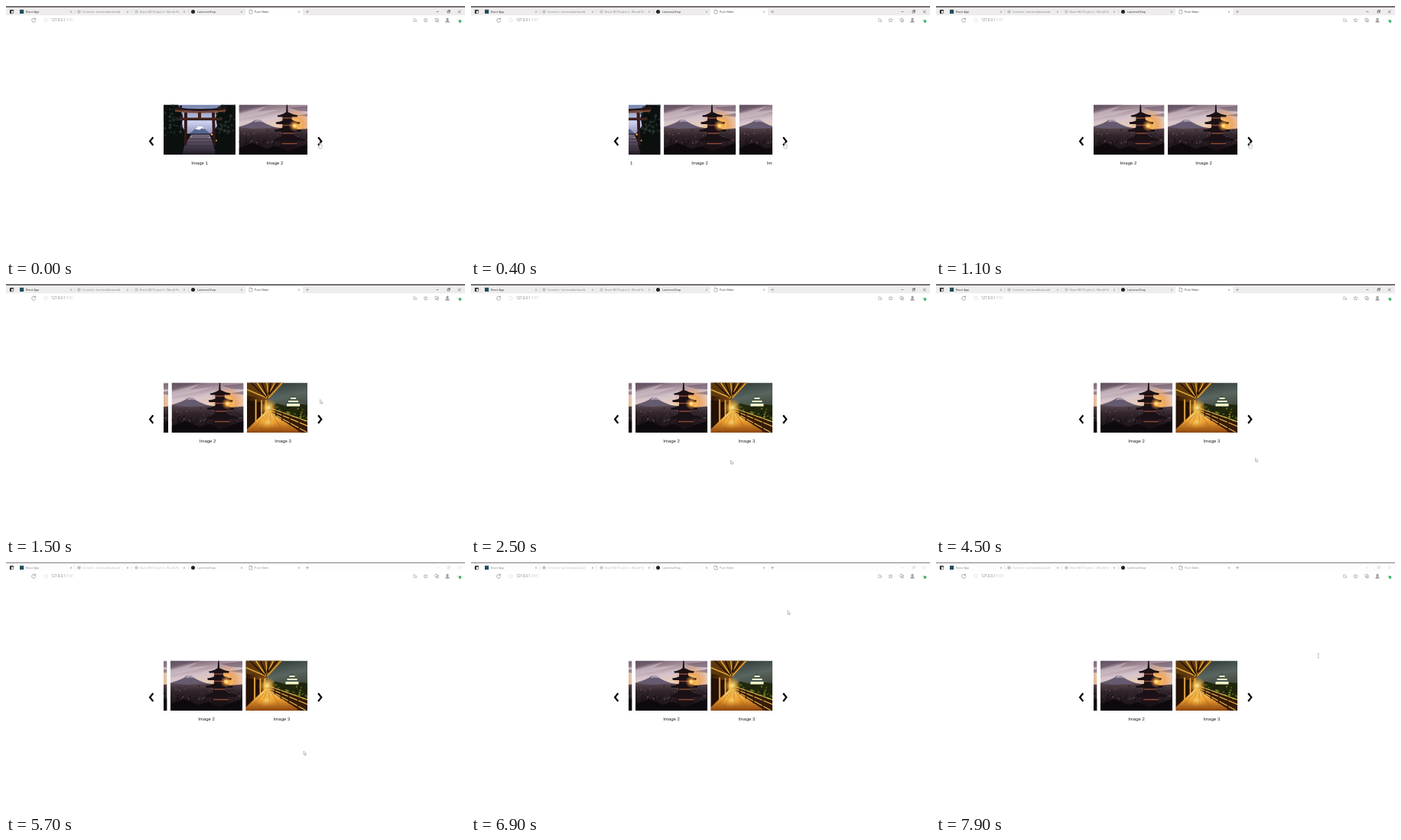
Animation of 600x328 px, one loop 8 s. Source, as an HTML page:

```html
<!DOCTYPE html>
<html lang="en">
<head>
<meta charset="utf-8">
<title>Pure Slider</title>
<style>
  html, body { margin: 0; width: 100%; height: 100%; overflow: hidden; background: #fff; }
  svg { display: block; width: 600px; height: 328px; }
  text { font-family: "Liberation Sans", Arial, sans-serif; }
  .tab, .url { font-family: "Open Sans", sans-serif; font-size: 3.7px; }
  .url { font-size: 4.4px; }
  .label { font-size: 6px; text-anchor: middle; fill: #222; }
  .line { fill: none; stroke: #777; stroke-width: .5; }
</style>
</head>
<body>
<svg viewBox="0 0 600 328" xmlns="http://www.w3.org/2000/svg">
  <defs>
    <clipPath id="view"><rect x="206" y="120" width="188" height="100"/></clipPath>
    <clipPath id="frame"><rect width="94" height="65.5"/></clipPath>
    <filter id="soft" x="0" y="0" width="1" height="1"><feGaussianBlur stdDeviation=".45"/></filter>
    <linearGradient id="dusk" x2="0" y2="1">
      <stop offset="0" stop-color="#7583b0"/><stop offset=".35" stop-color="#ccd0ee"/><stop offset=".6" stop-color="#8e8bb0"/>
    </linearGradient>
    <linearGradient id="path" x2="0" y2="1">
      <stop offset="0" stop-color="#776a80"/><stop offset="1" stop-color="#1f1922"/>
    </linearGradient>
    <linearGradient id="sunset" x2=".2" y2="1">
      <stop offset="0" stop-color="#665664"/><stop offset=".17" stop-color="#9f8894"/>
      <stop offset=".34" stop-color="#d5c3cb"/><stop offset=".5" stop-color="#e8cdb9"/>
    </linearGradient>
    <radialGradient id="sun">
      <stop offset="0" stop-color="#fffbe0"/><stop offset=".18" stop-color="#ffd566"/>
      <stop offset=".45" stop-color="#f2983c" stop-opacity=".7"/><stop offset="1" stop-color="#d98a50" stop-opacity="0"/>
    </radialGradient>
    <linearGradient id="town" x2="0" y2="1">
      <stop offset="0" stop-color="#5a4850"/><stop offset=".3" stop-color="#30242a"/><stop offset="1" stop-color="#140e13"/>
    </linearGradient>
    <linearGradient id="night" x2=".3" y2="1">
      <stop offset="0" stop-color="#202a29"/><stop offset=".4" stop-color="#59655f"/><stop offset="1" stop-color="#1c200c"/>
    </linearGradient>
    <linearGradient id="wall">
      <stop offset="0" stop-color="#2f1706"/><stop offset=".45" stop-color="#754211"/><stop offset="1" stop-color="#d09130"/>
    </linearGradient>
    <linearGradient id="deck" x2="0" y2="1">
      <stop offset="0" stop-color="#ffe584"/><stop offset=".45" stop-color="#eda032"/><stop offset="1" stop-color="#8a430d"/>
    </linearGradient>
    <radialGradient id="lamp">
      <stop offset="0" stop-color="#fff0a0"/><stop offset=".4" stop-color="#f9bd45" stop-opacity=".75"/><stop offset="1" stop-color="#e49527" stop-opacity="0"/>
    </radialGradient>

    <g id="gate" clip-path="url(#frame)">
      <rect width="94" height="66" fill="url(#dusk)"/>
      <g filter="url(#soft)">
        <path d="M32 40 45 28 50 28 63 40Z" fill="#566790"/>
        <path d="M41 32 45 28 50 28 54 32 50 31 47 33Z" fill="#f0f3fc"/>
        <path d="M0 38H94V66H0Z" fill="#110f15"/>
        <path d="M36 39H60L72 66H20Z" fill="url(#path)"/>
        <path d="M0 0H19L25 14 24 28 31 40 24 66H0Z" fill="#0b100f"/>
        <path d="M94 0H75L68 17 70 28 62 38 68 66H94Z" fill="#0b100f"/>
        <g id="leaves"></g>
        <path d="M27 10H31L30.500 53H27ZM63 10H67L68 53H64.500Z" fill="#30181a"/>
        <path d="M14 3Q47 8 82 3L83 6Q47 11 13 6Z" fill="#26161a"/>
        <path d="M15 6.500Q47 11 81 6.500V9Q47 13 15 9Z" fill="#7c4632"/>
        <path d="M20 17H76V20.500H20ZM45 10H49V18H45Z" fill="#40221e"/>
        <g fill="#ffb45a"><circle cx="63" cy="39" r="1.300"/><circle cx="36" cy="42" r=".8"/><circle cx="69" cy="47" r="1"/><circle cx="60" cy="43" r=".8"/></g>
        <path d="M33 45H62M31 49H64M29 54H66M26 60H69" stroke="#383040" stroke-width=".8"/>
      </g>
    </g>

    <g id="pagoda" clip-path="url(#frame)">
      <rect width="94" height="66" fill="url(#sunset)"/>
      <g filter="url(#soft)">
        <path d="M0 12 36 2 24 9 54 6 30 13 0 19ZM36 16 58 10 50 16Z" fill="#d6c5ce" opacity=".55"/>
        <path d="M0 0H40L16 5 0 10ZM66 4 94 1V9L78 8ZM76 14 94 11V16Z" fill="#57465a" opacity=".5"/>
        <path d="M0 29Q15 25 22 19.500L27 19.500Q34 26 52 31V36H0Z" fill="#655a70"/>
        <path d="M22 19.500 27 19.500 31 23 26 22 20 23Z" fill="#a79bae"/>
        <circle cx="73" cy="27" r="23" fill="url(#sun)"/>
        <path d="M0 29.500 20 31.500 50 30 70 33 94 31V66H0Z" fill="url(#town)"/>
        <g id="roofs"></g>
        <g fill="#1a1116">
          <path d="M62.200 0H63.500L64.200 11H61.500ZM57 14H69V23H57ZM57 24H70V34H57ZM56 35H72V47H56ZM54 48H76V66H54Z"/>
          <path d="M50 14Q57 13 61 10H65Q70 13 77 14L76 16H51ZM48 23Q56 22 59 19.500H69Q73 22 80 23L79 25.500H49ZM46 33Q55 32 58 29H70Q74 32 82 33L81 35.500H47ZM46 45Q54 43 57 40H72Q77 43 87 45L86 48H47Z"/>
        </g>
        <path d="M57 17.500H69M57 27H70M57 37.500H72M56 51H76" stroke="#8a4935" stroke-width="1.500"/>
        <circle cx="73" cy="27.500" r="8" fill="url(#sun)"/>
        <path d="M0 57 18 50 36 58 50 54 63 61 94 50V66H0Z" fill="#0e090d"/>
        <path d="M4 66 10 44M10 52 17 43M30 66 25 46M27 55 35 45M42 66 46 47" stroke="#0e090d" stroke-width=".8"/>
      </g>
    </g>

    <g id="castle" clip-path="url(#frame)">
      <rect width="94" height="66" fill="url(#night)"/>
      <g filter="url(#soft)">
        <path d="M27 35 38 27 53 31 68 28 94 31V66H27Z" fill="#20270d"/>
        <g id="bushes"></g>
        <path d="M49 28 52 25H67L70 28ZM52 24 54 21H66L68 24ZM55 20 60 16 65 20Z" fill="#465a50"/>
        <path d="M52 27.500H69V31H52ZM54 23.500H67V25.500H54ZM57 19.500H64V21.500H57Z" fill="#f4f3ca"/>
        <path d="M0 0H48L27 22V43L0 66Z" fill="url(#wall)"/>
        <path d="M0 0H48L27 21 0 17Z" fill="#5d390d"/>
        <path d="M13 0 26 19M26 0 28 16M36 0 28 17M46 0 28 20M0 9 26 20" stroke="#dfa237" stroke-width="1.600"/>
        <path d="M5 0 25 19M19 0 26 17M31 0 28 15M41 0 28 16" stroke="#251204" stroke-width="1.700"/>
        <path d="M0 23 10 24V55L0 61ZM13 25 18 25V47L13 51ZM20 25H23V42L20 45Z" fill="#251105"/>
        <path d="M11.500 22V56M19 23V47M25 23V43" stroke="#edb34c" stroke-width="1.600"/>
        <path d="M25 37H33L80 66H0V61Z" fill="url(#deck)"/>
        <path d="M29 38 15 66M30 38 32 66M31 38 49 66M27 39 3 66" stroke="#a55b18" stroke-width=".6"/>
        <path d="M32 35 94 58V66H72L32 40Z" fill="#351b08"/>
        <path d="M32 34 94 56M32 37 94 63M32 39.500 78 65" stroke="#f0bc57" stroke-width="1.200"/>
        <path d="M38 36V44M46 39V50M56 43V56M68 47V65M82 53V66" stroke="#3d1d07" stroke-width="1.500"/>
        <circle cx="28" cy="33" r="12" fill="url(#lamp)"/>
        <ellipse cx="27" cy="52" rx="15" ry="9" fill="url(#lamp)" opacity=".6"/>
      </g>
    </g>
  </defs>

  <rect width="600" height="328" fill="#fff"/>
  <rect id="strip" y="1" width="600" height="11.200"/>
  <rect id="edge" width="600" height="2"/>
  <rect x="313" y="3" width="75" height="10" rx="1" fill="#fff"/>
  <g id="tabs"></g>
  <g>
    <rect x="5.300" y="5.300" width="4.400" height="4.400" rx=".8" fill="none" stroke="#333" stroke-width=".6"/>
    <path d="M5 5H10V6.500H7V10H5Z" fill="#333"/>
    <rect x="18" y="4.800" width="5.200" height="5.200" fill="#214e5d"/>
    <circle cx="95.500" cy="7.500" r="2.300" fill="#c4c4c4"/>
    <circle cx="170.500" cy="7.500" r="2.300" fill="#ccc"/>
    <circle cx="244.500" cy="7.500" r="2.500" fill="#222"/>
    <path class="line" d="M318 5H320.500L322 6.500V10H318ZM320.500 5V6.500H322"/>
  </g>
  <path id="buttons" d="M562.500 7.500H565.500M577 6.500H579.500V9H577ZM578 6.500V5.500H580.500V8H579.500M591 5.800 594.500 9.300M594.500 5.800 591 9.300" fill="none" stroke-width=".5"/>

  <g class="line">
    <path d="M38.200 17.200A2.500 2.500 0 1 0 38.700 19M38.600 15.500V17.400H36.700" stroke="#555"/>
    <circle cx="52" cy="18.700" r="2.300" stroke="#ccc"/>
    <path d="M532.500 16.800H535V20.500H532.500ZM535 18.300H536.800V20.500H535" stroke="#999"/>
    <path d="M548.500 16 549.300 17.700 551.100 17.900 549.800 19.200 550.100 21 548.500 20.100 546.900 21 547.200 19.200 545.900 17.900 547.700 17.700Z"/>
    <path d="M561 16.300H564V19.500H561ZM562.500 19.500V21H565.200V17.500H564"/>
    <circle cx="577" cy="17.300" r="1.300" fill="#aaa"/>
    <path d="M574.700 21.200Q574.900 19.200 577 19.200T579.300 21.200Z" fill="#aaa"/>
    <path d="M589.500 18.500H592" stroke-dasharray=".8 .8"/>
  </g>
  <circle cx="593.500" cy="20" r="1.900" fill="#3fb56f"/>
  <text class="url" x="59" y="20.300" fill="#777">127.0.0.1<tspan fill="#ccc">:5501</tspan></text>

  <g clip-path="url(#view)"><g id="track"></g></g>
  <path d="M192.300 172.200 188.100 177.500 192.300 182.800M408.100 172.200 412.300 177.500 408.100 182.800" fill="none" stroke="#000" stroke-width="2.200"/>

  <g id="cursor" fill="#fff" stroke="#777" stroke-width=".45" stroke-linejoin="round">
    <path id="arrow" d="M0 0V5L1.200 4 2 6 2.900 5.600 2.100 3.700H3.700Z"/>
    <path id="hand" d="M-.6 0H.5V3L3 3.700V6L2.300 8H-.7L-2.300 5.200-1.800 4.500-.6 5.400Z"/>
    <path id="beam" d="M-1-2.700H1M0-2.700V2.700M-1 2.700H1"/>
  </g>
</svg>
<script>
const $ = id => document.getElementById(id);
const LOOP = 8000, STEP = 100, PITCH = 98.5;

// Seeded speckle for foliage and rooftops
let seed = 7;
const rnd = (a, b) => {
  seed = (seed * 16807) % 2147483647;
  return a + (b - a) * seed / 2147483647;
};
function speckle(id, count, [x0, x1, y0, y1], size, colors) {
  let out = "";
  for (let i = 0; i < count; i++) {
    out += `<circle cx="${rnd(x0, x1).toFixed(1)}" cy="${rnd(y0, y1).toFixed(1)}" r="${rnd(size / 2, size).toFixed(1)}" fill="${colors[i % colors.length]}"/>`;
  }
  $(id).innerHTML += out;
}
speckle("leaves", 45, [0, 25, 0, 40], 2.2, ["#1b2823", "#080c0c", "#26322c"]);
speckle("leaves", 45, [69, 94, 0, 40], 2.2, ["#1b2823", "#080c0c", "#26322c"]);
speckle("roofs", 70, [0, 94, 33, 52], 1, ["#655058", "#1c151a", "#42333a"]);
speckle("bushes", 50, [30, 94, 31, 50], 1.8, ["#4d5818", "#171d09", "#727821"]);

const tabs = [
  [26, "React App", 1, 85],
  [100, "Commits · karimsolda/would", 0, 159],
  [175, "React ND Project 2 - Would Yo", 0, 233],
  [250, "LanternaShop", 1, 308],
  [325, "Pure Slider", 1, 383]
];
$("tabs").innerHTML = tabs.map(([x, name, dark, end]) =>
  `<text class="tab" data-dark="${dark}" x="${x}" y="8.900">${name}</text>` +
  `<path class="line" d="M${end - 1.1} 6.500l2.200 2.200m0-2.200l-2.200 2.200"/>`
).join("") +
  '<path d="M90 5V10M164 5V10M238.500 5V10" stroke="#ccc" stroke-width=".5"/>' +
  '<path class="line" d="M392 7.500H396M394 5.500V9.500"/>';

$("track").innerHTML = [["gate", 1], ["pagoda", 2], ["pagoda", 2], ["castle", 3]].map(([id, n], i) => {
  const x = 206 + i * PITCH;
  return `<use href="#${id}" x="${x}" y="129.500"/><text class="label" x="${x + 47}" y="208">Image ${n}</text>`;
}).join("");

const ease = p => {
  p = Math.min(1, Math.max(0, p));
  return p * p * (3 - 2 * p);
};

const route = [
  [0, 410.3, 179], [1100, 410.3, 179], [1500, 410.5, 151.5], [1900, 409, 150],
  [2100, 409, 150], [2500, 339.5, 231], [3000, 331, 246], [3600, 331, 246],
  [4000, 578, 8], [4200, 578, 8], [4500, 417.5, 228], [4900, 389, 248],
  [5900, 389, 248], [6700, 388, 60], [6800, 388, 60], [7200, 553, 82],
  [7300, 553, 82], [7900, 499.8, 123], [8000, 499.8, 123]
];
function cursorAt(t) {
  const i = route.findIndex(k => k[0] > t);
  const [t0, x0, y0] = route[i - 1], [t1, x1, y1] = route[i];
  const p = ease((t - t0) / (t1 - t0));
  return [x0 + (x1 - x0) * p, y0 + (y1 - y0) * p];
}

function draw(t) {
  const scroll = 94 * (ease((t - 120) / 520) + ease((t - 1020) / 520));
  $("track").setAttribute("transform", `translate(${-scroll.toFixed(2)})`);

  const [x, y] = cursorAt(t);
  $("cursor").setAttribute("transform", `translate(${x.toFixed(2)} ${y.toFixed(2)})`);
  const kind = t < 1300 ? "hand" : t < 7400 ? "arrow" : "beam";
  for (const id of ["hand", "arrow", "beam"]) $(id).style.display = id === kind ? "" : "none";

  const focus = t < 5700;
  $("edge").setAttribute("fill", focus ? "#777171" : "#b9b6b6");
  $("strip").setAttribute("fill", focus ? "#eeecec" : "#fdfdfd");
  $("buttons").setAttribute("stroke", focus ? "#333" : "#ccc");
  for (const el of document.querySelectorAll(".tab")) {
    const dark = el.dataset.dark === "1";
    el.setAttribute("fill", focus ? (dark ? "#333" : "#888") : (dark ? "#888" : "#bbb"));
  }
}

function tick(now) {
  draw(Math.floor((now % LOOP) / STEP) * STEP);
  requestAnimationFrame(tick);
}
draw(0);
requestAnimationFrame(tick);
</script>
</body>
</html>
```
